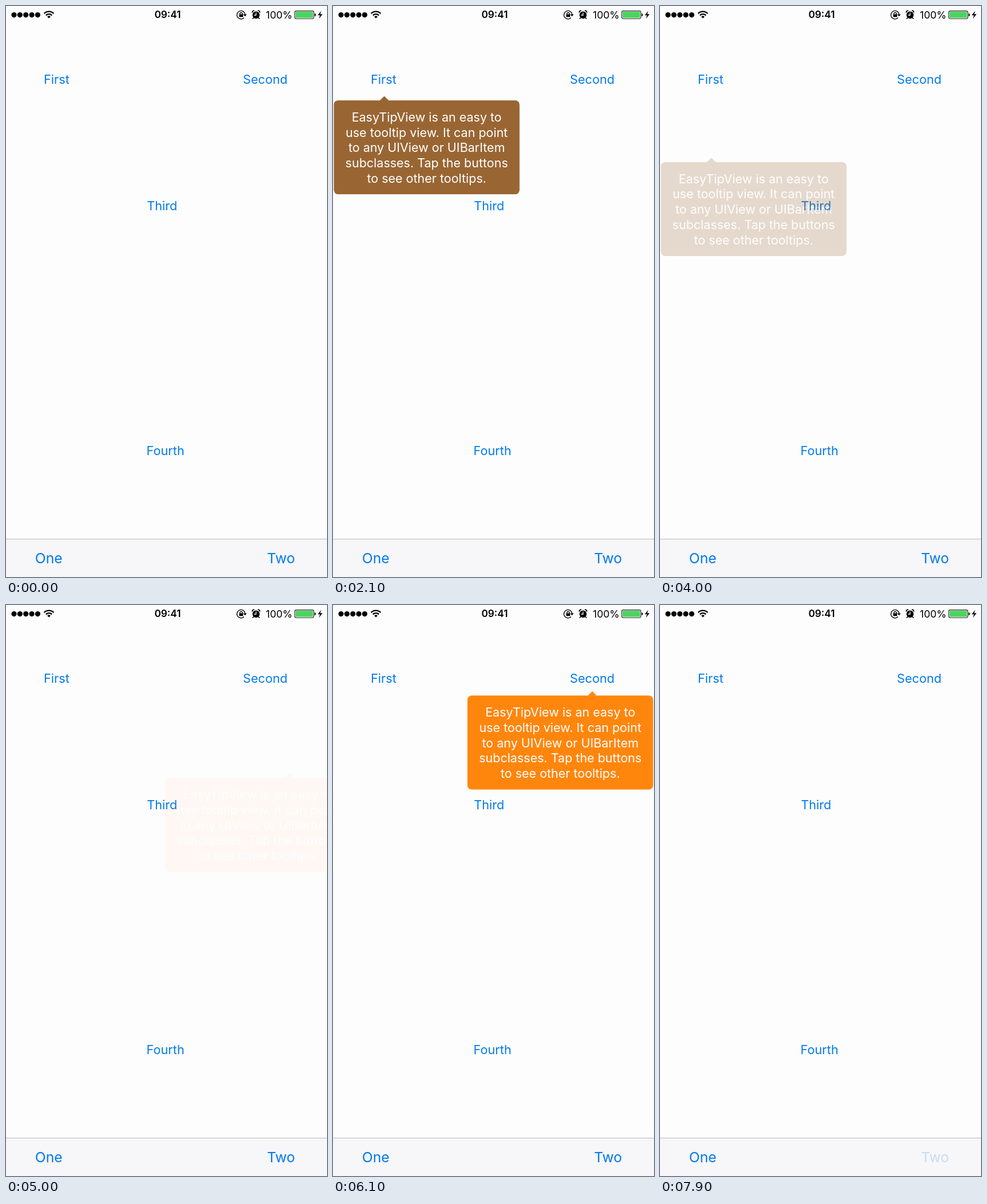
Animation, 561 px wide and 998 px high, one loop 8000 ms. Source, as an HTML page:

```html
<!DOCTYPE html>
<html lang="en">
<head>
<meta charset="utf-8">
<title>Tooltips</title>
<style>
  html, body { margin: 0; width: 100%; height: 100%; overflow: hidden; background: #fefdfe; }
  svg { display: block; width: 561px; height: 998px; font-family: Inter, "Open Sans", sans-serif; }
  .link { fill: #007aec; font-size: 21.7px; }
  .bar { font-size: 24.7px; }
  .tip text { fill: #fff; font-size: 21.5px; text-anchor: middle; }
</style>
</head>
<body>
<svg id="stage" viewBox="0 0 561 998" xmlns="http://www.w3.org/2000/svg">
  <rect width="561" height="998" fill="#fefdfe"/>
  <rect y="932" width="561" height="66" fill="#f7f6f9"/>
  <rect y="931.2" width="561" height="1.1" fill="#bbbabd"/>

  <g id="links"></g>
  <g id="tips"></g>

  <g id="dots"></g>
  <g fill="none" stroke="#000" stroke-width="2.4">
    <path d="M66.6 13.1a11.9 11.9 0 0 1 16.8 0M69.8 16.3a7.4 7.4 0 0 1 10.4 0"/>
  </g>
  <path d="M75 21.6l-2.9-2.9a4.1 4.1 0 0 1 5.8 0z"/>
  <text x="282.5" y="21.4" font-size="17.3" font-weight="600" text-anchor="middle">09:41</text>

  <g fill="none" stroke="#000" stroke-width="1.4">
    <path d="M416 20.6A7.2 7.2 0 1 1 417.9 14.6"/>
    <path d="M409 15v-1.6a2 2 0 0 1 4 0V15"/>
  </g>
  <path d="M407.6 14.6h6.8v4.7h-6.8zM414.6 14.4h6.2l-3.1 3.8z"/>

  <circle cx="437" cy="15.8" r="6.3"/>
  <path d="M432.6 20.5l-1.6 2M441.4 20.5l1.6 2M430.4 11.6a3 3 0 0 1 3.6-3.4M443.6 11.6a3 3 0 0 0-3.6-3.4" fill="none" stroke="#000" stroke-width="1.8"/>
  <path d="M437 11.6v4.4h-3.4" fill="none" stroke="#fff" stroke-width="1.3"/>

  <text x="454" y="21.8" font-size="17.6">100%</text>
  <rect x="504.6" y="8.6" width="33.4" height="13.6" rx="2.6" fill="#fefdfe" stroke="#222" stroke-width="1.1"/>
  <rect x="506" y="10" width="30.6" height="10.8" rx="1.2" fill="#4cd45f"/>
  <path d="M539.2 13a2.5 2.5 0 0 1 0 5z" fill="#222"/>
  <path d="M550.8 8.6l-6 7.7h4l-2 6 6.4-8h-4.1z"/>
</svg>
<script>
const LOOP = 8000;
const SHIFT = 1.496; // pixels per point
const LINES = [
  'EasyTipView is an easy to',
  'use tooltip view. It can point',
  'to any UIView or UIBarItem',
  'subclasses. Tap the buttons',
  'to see other tooltips.'
];

function add(parent, name, attrs, text = '') {
  const el = document.createElementNS('http://www.w3.org/2000/svg', name);
  for (const key in attrs) el.setAttribute(key, attrs[key]);
  el.textContent = text;
  return parent.appendChild(el);
}

const byId = id => document.getElementById(id);

for (let i = 0; i < 5; i++) add(byId('dots'), 'circle', { cx: 14 + i * 10.35, cy: 15.6, r: 4.6 });

const link = (text, x, y, cls = 'link') => add(byId('links'), 'text', { x, y, class: cls }, text);
const first = link('First', 66, 135.8);
link('Second', 414, 135.8);
link('Third', 246.2, 357);
link('Fourth', 245.6, 784.8);
link('One', 50.8, 974, 'link bar');
const two = link('Two', 456.2, 974, 'link bar');

function makeTip(left, arrow, color, motion) {
  const g = add(byId('tips'), 'g', { class: 'tip' });
  add(g, 'rect', { x: left, y: 158.3, width: 324.6, height: 164.2, rx: 7.5, fill: color });
  add(g, 'path', { d: `M${arrow - 7.8} 158.5l7.8-7.7 7.8 7.7z`, fill: color });
  LINES.forEach((line, i) => add(g, 'text', { x: left + 162.3, y: 195.2 + i * 26.75 }, line));
  return { g, ...motion };
}

const tips = [
  makeTip(1.4, 89.6, '#996633', { show: 1400, hide: 3695, from: [0, -100], to: [0, 100] }),
  makeTip(235, 453.2, '#ff860d', { show: 4970, hide: 6617, from: [30, 100], to: [-30, -100] })
];

// Distance left to travel for a spring: damping 0.7, initial velocity 0.7, 1.5 s.
function spring(ms) {
  const t = ms / 1000, decay = 4.6, freq = 4.69;
  return Math.exp(-decay * t) * (Math.cos(freq * t) + (decay - 0.7) / freq * Math.sin(freq * t));
}

function drawTip(tip, t) {
  const leaving = t >= tip.hide;
  const left = spring(t - (leaving ? tip.hide : tip.show));
  const alpha = t < tip.show || t > tip.hide + 1000 ? 0 : leaving ? left : 1 - left;
  const [dx, dy] = leaving ? tip.to : tip.from;
  const k = SHIFT * (leaving ? 1 - left : left);
  tip.g.setAttribute('opacity', Math.min(1, Math.max(0, alpha)));
  tip.g.setAttribute('transform', `translate(${dx * k} ${dy * k})`);
}

function press(el, on) {
  el.setAttribute('opacity', on ? 0.2 : 1);
}

function draw(t) {
  press(first, t >= 1290 && t < 1400);
  press(two, t >= 7890);
  tips.forEach(tip => drawTip(tip, t));
}

const start = performance.now();
function tick() {
  draw((performance.now() - start) % LOOP);
  requestAnimationFrame(tick);
}
tick();
</script>
</body>
</html>
```
